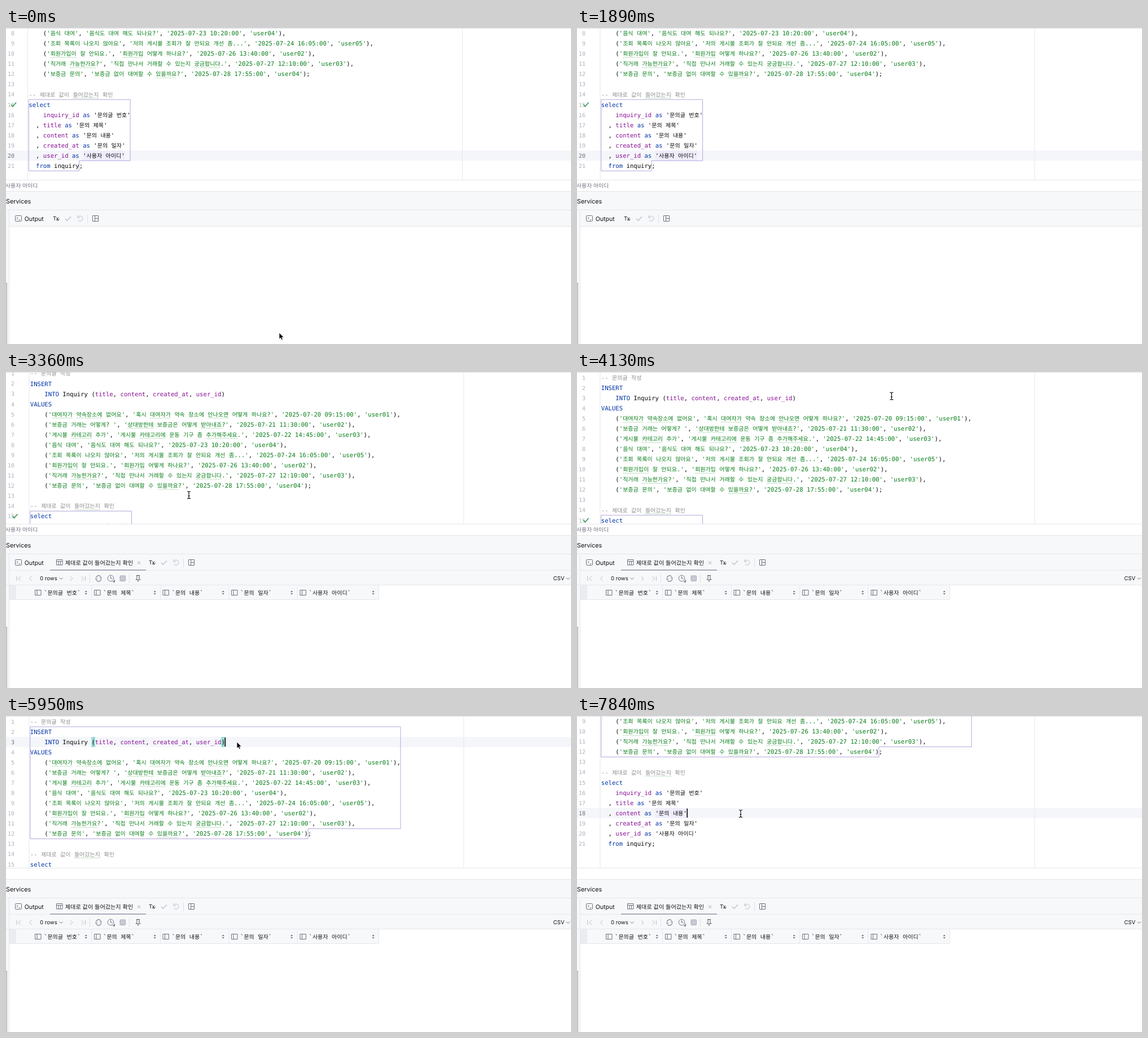
Animation of 1001x560 px, one loop 8 s. Source, as an HTML page:

```html
<!DOCTYPE html>
<html lang="ko">
<head>
<meta charset="utf-8">
<title>SQL console</title>
<style>
  html, body { margin: 0; width: 100%; height: 100%; overflow: hidden; background: #fff; }
  svg { display: block; }
  text { white-space: pre; text-rendering: geometricPrecision; }
  .mono { font: 10.61px "DejaVu Sans Mono", monospace; }
  .hangul { font: 10.03px "Noto Sans CJK KR", "Noto Sans CJK", sans-serif; }
  .ui { font: 10.6px Inter, "Noto Sans CJK KR", "Noto Sans CJK", sans-serif; }
  .icon { fill: none; stroke: #6c707e; stroke-width: 1; }
  .dim { stroke: #b9bdc9; }
  .rule { stroke: #e6e7ec; }
</style>
</head>
<body>
<svg id="stage" width="1001" height="560" viewBox="0 0 1001 560"></svg>
<script>
const LATIN = 6.39, HANGUL = 9.23, ROW = 18.06, LEFT = 42.8;
const LOOP = 8000, STEP = 70, LAST = 7840;

// Tildes enclose words with a spelling underline.
const LINES = `-- 문의글 작성
INSERT
    INTO Inquiry (title, content, created_at, user_id)
VALUES
    ('~대여자가~ ~약속장소에~ 없어요', '혹시 ~대여자가~ 약속 장소에 ~안나오면~ 어떻게 하나요?', '2025-07-20 09:15:00', 'user01'),
    ('보증금 거래는 어떻게? ', '~상대방한테~ 보증금은 어떻게 ~받아내죠~?', '2025-07-21 11:30:00', 'user02'),
    ('게시물 ~카테고리~ 추가', '게시물 ~카테고리에~ 운동 기구 좀 ~추가해주세요~.', '2025-07-22 14:45:00', 'user03'),
    ('음식 대여', '음식도 대여 해도 되나요?', '2025-07-23 10:20:00', 'user04'),
    ('조회 목록이 나오지 않아요', '저의 게시물 조회가 잘 안되요 개선 좀...', '2025-07-24 16:05:00', 'user05'),
    ('~회원가입이~ 잘 안되요.', '~회원가입~ 어떻게 하나요?', '2025-07-26 13:40:00', 'user02'),
    ('직거래 ~가능한가요~?', '직접 만나서 거래할 수 있는지 ~궁금합니다~.', '2025-07-27 12:10:00', 'user03'),
    ('보증금 문의', '보증금 없이 대여할 수 ~있을까요~?', '2025-07-28 17:55:00', 'user04');

-- 제대로 값이 ~들어갔는지~ 확인
select
    inquiry_id as '문의글 번호'
  , title as '문의 제목'
  , content as '문의 내용'
  , created_at as '문의 일자'
  , user_id as '사용자 아이디'
  from inquiry;`.split('\n');

const isHangul = s => /[가-힣]/.test(s);
const widthOf = s => [...s].reduce((w, c) => w + (c === '~' ? 0 : isHangul(c) ? HANGUL : LATIN), 0);
const rowY = n => 10 + ROW * (n - 1);

function mixedText(s, x, y, fill) {
  let out = '';
  s.split('~').forEach((part, i) => {
    const from = x;
    for (const run of part.split(/([가-힣]+)/)) {
      if (run.trim()) out += `<text class="${isHangul(run) ? 'hangul' : 'mono'}" x="${x}" y="${y}" fill="${fill}">${run}</text>`;
      x += widthOf(run);
    }
    if (i % 2) out += `<path d="M${from} ${y + 3}H${x}" stroke="#9bcf9f" stroke-dasharray="1.6 1"/>`;
  });
  return out;
}

function tokenColor(token, line) {
  if (token.startsWith('--')) return '#8c8c8c';
  if (token[0] === "'") return / as '/.test(line) ? '#080808' : '#067d17';
  if (/^(INSERT|INTO|VALUES|select|as|from)$/.test(token)) return '#0033a8';
  if (/^(title|content|created_at|user_id|inquiry_id)$/.test(token)) return '#871094';
  return '#080808';
}

function codeLine(line, i) {
  let x = LEFT;
  return (line.match(/--.*|'[^']*'|\w+|\s+|[^\w\s']+/g) || []).map(token => {
    const out = mixedText(token, x, rowY(i + 1) + 3.8, tokenColor(token, line));
    x += widthOf(token);
    return out;
  }).join('');
}

const rect = (x, y, w, h, fill, extra = '') => `<rect x="${x}" y="${y}" width="${w}" height="${h}" fill="${fill}" ${extra}/>`;
const icon = (d, cls = '', extra = '') => `<path class="icon ${cls}" d="${d}" ${extra}/>`;
const label = (s, x, y, size = 10.6, extra = 'fill="#111"') => `<text class="ui" x="${x}" y="${y}" style="font-size:${size}px" ${extra}>${s}</text>`;
const hline = (y, x1 = 0, x2 = 1001) => icon(`M${x1} ${y}H${x2}`, 'rule');
const vline = (x, y1, y2) => icon(`M${x} ${y1}V${y2}`, 'rule');
const group = (id, body) => `<g id="${id}">${body}</g>`;

// Outline of a statement whose last row is shorter than the others.
function outline(id, first, last, right, end) {
  const top = rowY(first) - 9, mid = rowY(last) - 9, bottom = rowY(last) + 9;
  return `<path id="${id}" d="M${LEFT} ${top}H${right}V${mid}H${end}V${bottom}H${LEFT}Z" fill="none" stroke="#b3a6dd"/>`;
}

const aliasBack = row => {
  const [before, alias] = LINES[row - 1].split(/(?=')/);
  return rect(LEFT + widthOf(before), rowY(row) - 9, widthOf(alias) + LATIN, 18, '#efedfb', `id="alias${row}"`);
};

const editor =
  rect(0, 0, 1001, 18, '#f5f6fa', 'id="current"') +
  group('margins', vline(41, 0, 269) + vline(811, 0, 269)) +
  group('code',
    aliasBack(18) + aliasBack(20) +
    group('parens', [17, 53].map(c => rect(LEFT + c * LATIN, rowY(3) - 9, LATIN, 18, '#93d9d3')).join('')) +
    LINES.map(codeLine).join('') +
    outline('insertBox', 2, 12, 699, 535) + outline('selectBox', 15, 21, 222.6, 132) +
    group('bulb', `<circle cx="54" cy="${rowY(19) - 5}" r="4.2" fill="#f3a92f"/>` + rect(52.2, rowY(19) - 1, 3.6, 3.2, '#8a8d98')) +
    rect(0, 0, 1.6, 16, '#000', 'id="caret"')) +
  group('gutter', LINES.map((_, i) =>
    `<text class="mono num" x="15" y="${rowY(i + 1) + 3.7}" text-anchor="end" style="font-size:10px">${i + 1}</text>`).join('')) +
  group('check', icon(`M11.5 ${rowY(15)}l3 3.2 6 -7`, '', 'style="stroke:#3d9a57;stroke-width:1.7"'));

const txTools =
  label('Tx', 83, 341, 9.6) + icon('M90.5 339.5l1.5 1.8 2.5 -3', '', 'style="stroke:#333"') +
  icon('M105 338l3.3 3.4 6.5 -7.2', 'dim', 'style="stroke-width:1.3"') +
  icon('M127 332.5v3.6h3.6M127.3 335.8a4.5 4.5 0 1 1 .4 4.5', 'dim') +
  icon('M144.5 329.5v17', '', 'style="stroke:#dfe1e7"') +
  icon('M153.5 332.5h10v10h-10zM157.5 332.5v10M157.5 337.5h6');

const grid = icon('M89.5 332.5h10.5v9.5h-10.5zM89.5 335.5h10.5M93 335.5v6.5M96.5 335.5v6.5');

const resultTools =
  rect(6, 352, 995, 26, '#f7f8fa') +
  icon('M18.8 362v8M26 362l-4 4 4 4M45.5 362l-4 4 4 4M114 362l4 4 -4 4M133.5 362l4 4 -4 4M140.5 362v8', 'dim') +
  label('0 rows', 60, 369, 9.6) + icon('M94.5 364.5l3 3 3 -3') +
  icon('M148.5 358v16M218.5 358v16', '', 'style="stroke:#dfe1e7"') +
  icon('M159.3 365a4.8 4.8 0 0 1 9 -1.7M168.8 367a4.8 4.8 0 0 1 -9 1.7M166 365h4M158 367h4', '', 'style="stroke:#4f5361"') +
  `<circle class="icon" cx="185.5" cy="365.5" r="5.3"/>` + icon('M185.5 362v4h3') + `<path d="M193 368v4.5h-4.5z" fill="#6c707e"/>` +
  rect(202, 361, 9.5, 9.5, '#c6c9d2', 'rx="1" stroke="#a9adb9"') +
  icon('M231 360.5h6M232 360.5v5l-2 2.5h8l-2 -2.5v-5M234 368v4', '', 'style="stroke:#4f5361"') +
  label('CSV', 969.5, 369, 9.6) + icon('M993 364.5l3 3 3 -3');

const columns = [['문의글 번호', 51, 151], ['문의 제목', 156, 273], ['문의 내용', 277.5, 394], ['문의 일자', 399, 515.5], ['사용자 아이디', 520.5, 660]];
const header =
  rect(6, 378, 654, 25.5, '#f7f8fa') + rect(6, 378, 12, 25.5, '#ebecf0') + hline(377.5) + hline(403.5, 6, 660) +
  columns.map(([name, x, end]) =>
    icon(`M${x + .5} 386.5h10.5v9h-10.5zM${x + 4} 386.5v9`) +
    mixedText('`' + name + '`', x + 16, 394.8, '#111') +
    `<path d="M${end - 11.5} 390l2.2 -2.6 2.2 2.6zM${end - 11.5} 392l2.2 2.6 2.2 -2.6z" fill="#6c707e"/>` +
    vline(end + .5, 378, 403)).join('');

const spinner = [...Array(8)].map((_, i) =>
  `<path d="M0 -5V-10" stroke="#6c707e" stroke-width="2" stroke-linecap="round" opacity="${.1 + i * .06}" transform="rotate(${i * 45})"/>`).join('');

document.getElementById('stage').innerHTML =
  `<clipPath id="clip"><rect width="1001" height="269"/></clipPath>` +
  rect(0, 0, 1001, 560, '#fff') +
  `<g clip-path="url(#clip)">${editor}</g>` +
  rect(0, 0, 1001, .7, '#d3d4d8') + hline(269.5) +
  group('crumb', label('사용자 아이디', -1, 283, 9.9, 'fill="#6c707e"')) +
  rect(0, 290, 1001, 62, '#f7f8fa') + rect(0, 352, 5, 208, '#f7f8fa') +
  hline(289.5) + hline(322.5) + hline(351.5, 5) + vline(5.5, 323, 560) + rect(0, 451, 2.2, 109, '#c3c4c8') +
  label('Services', 0, 310.6, 10.8, 'font-weight="600" fill="#111"') +
  icon('M17.5 332.5h9a1 1 0 0 1 1 1v8a1 1 0 0 1 -1 1h-9a1 1 0 0 1 -1 -1v-8a1 1 0 0 1 1 -1zM18.8 335l2.2 2.2 -2.2 2.2M22.5 340h3') +
  label('Output', 32.7, 341.8) +
  group('txTools', txTools) +
  group('tab', grid + label('제대로 값이 들어갔는지 확인', 104.8, 341.6, 10.15) +
    icon('M233 335.5l5 5M238 335.5l-5 5', '', 'style="stroke:#a2a6b3"') + rect(78, 350, 170, 2, '#a8adbd') + resultTools) +
  group('header', header) + group('spinner', spinner) +
  group('arrow', `<path d="M0 0V11.4L2.6 9 4.4 13 6.4 12.1 4.7 8.2H8.2Z" fill="#000" stroke="#fff" stroke-width=".8"/>`) +
  group('ibeam', [['#fff', 2.6], ['#111', 1.2]].map(([c, w]) =>
    `<path d="M-3 -6.5Q0 -6.5 0 -4.5Q0 -6.5 3 -6.5M0 -5V5M-3 6.5Q0 6.5 0 4.5Q0 6.5 3 6.5M-1.5 1.5H1.5" fill="none" stroke="${c}" stroke-width="${w}"/>`).join(''));

const el = id => document.getElementById(id);
const numbers = [...document.querySelectorAll('.num')];
const show = (id, on) => el(id).setAttribute('visibility', on ? 'visible' : 'hidden');
const move = (id, x, y) => el(id).setAttribute('transform', `translate(${x} ${y})`);
const within = (t, ...spans) => spans.some(([a, b]) => t >= a && t < b);
const progress = (t, a, b) => Math.min(1, Math.max(0, (t - a) / (b - a)));
const smoother = u => u * u * u * (u * (6 * u - 15) + 10);
const easeOut = u => 1 - (1 - u) ** 2;

const scrollAt = t => t < 5000
  ? 127 * (1 - smoother(progress(t, 2800, 3500)))
  : 145 * easeOut(progress(t, 6690, 7660));

// time, x, y
const PATH = [
  [0, 484, 540], [280, 327, 240], [350, 327, 240], [700, 131, 160],
  [2870, 324, 218], [3640, 324, 218], [3990, 672, 90], [4200, 500, 19], [4340, 222, 60],
  [4480, 380, 90], [4620, 409, 46], [6650, 409, 46], [6790, 388, 110], [7420, 388, 110], [7700, 290, 173]
];

function pointerAt(t) {
  const i = PATH.findIndex(p => p[0] > t);
  if (i < 0) return PATH[PATH.length - 1].slice(1);
  const [a, b] = [PATH[i - 1], PATH[i]];
  const u = progress(t, a[0], b[0]);
  return [a[1] + (b[1] - a[1]) * u, a[2] + (b[2] - a[2]) * u];
}

function render(t) {
  const scroll = scrollAt(t), shift = t < 1890 ? -2.5 : 0;
  const row = t < 4620 ? 20 : t < 7770 ? 3 : 18;

  move('code', shift, -scroll);
  move('check', shift, -scroll);
  move('margins', shift + .5 - .5, 0);
  move('gutter', 0, -scroll);
  move('current', 0, rowY(row) - 9 - scroll);
  numbers.forEach((n, i) => n.setAttribute('fill', i + 1 === row ? '#6c707e' : '#aeb3c2'));

  const caretX = row === 3 ? LEFT + 54 * LATIN : LEFT + widthOf(LINES[row - 1]);
  move('caret', caretX - .3, rowY(row) - 8);
  show('caret', within(t, [770, 1260], [2030, 2520], [3010, 3500], [4620, 5530], [5950, LOOP]));
  show('alias20', row === 20);
  show('alias18', row === 18);
  show('parens', row === 3);
  show('selectBox', t < 5180);
  show('insertBox', t >= 5180);
  show('check', t < 5950);
  show('bulb', within(t, [2800, 3220]));
  show('crumb', t < 5040);

  const hasTab = t >= 1960;
  show('tab', hasTab);
  show('header', t >= 2100);
  move('txTools', hasTab ? 170 : 0, 0);
  move('spinner', 567, 494.5);
  show('spinner', within(t, [2100, 2520]));

  const [x, y] = pointerAt(t);
  const visible = !within(t, [770, 2870]);
  const isArrow = within(t, [0, 210], [4760, 6720]);
  move('arrow', x, y);
  move('ibeam', x, y);
  show('arrow', visible && isArrow);
  show('ibeam', visible && !isArrow);
}

const start = performance.now();
function tick() {
  const t = (performance.now() - start) % LOOP;
  render(Math.min(LAST, Math.floor(t / STEP) * STEP));
  requestAnimationFrame(tick);
}
tick();
</script>
</body>
</html>
```
